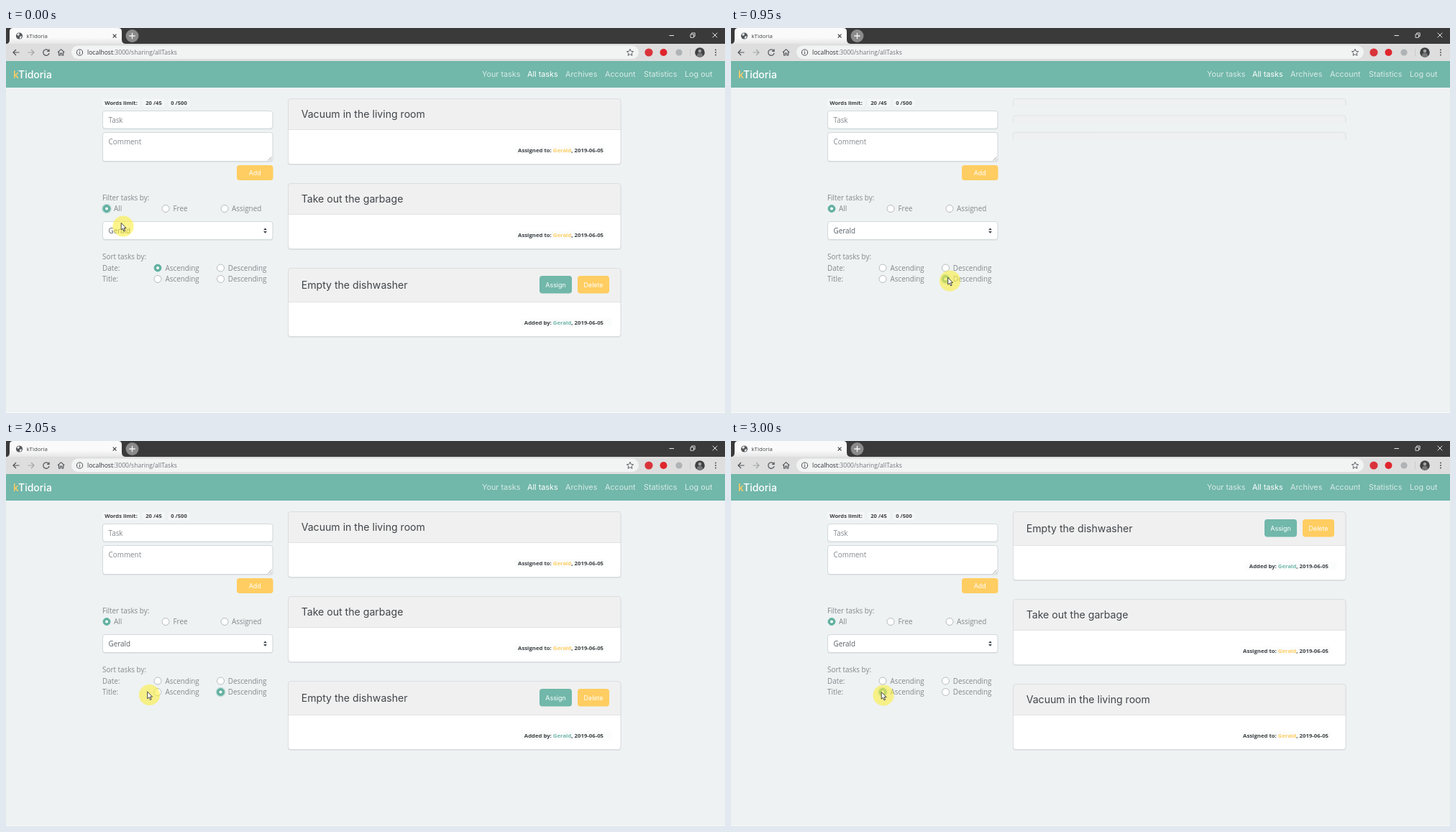
An HTML page that plays this animation: 1000 by 536 pixels, repeating every 3.45 s.

```html
<!DOCTYPE html>
<html lang="en">
<head>
<meta charset="utf-8">
<title>kTidoria</title>
<style>
  html, body { margin: 0; width: 100%; height: 100%; overflow: hidden; background: #eef2f3; }
  #stage { display: block; width: 100%; height: 100%; }
  text { font-family: "Open Sans", "Noto Sans", sans-serif; white-space: pre; }
  .wide { font-family: Inter, "Open Sans", sans-serif; }
</style>
</head>
<body>
<svg id="stage" viewBox="0 0 1000 536">
  <defs>
    <linearGradient id="tab" x2="0" y2="1">
      <stop offset=".6" stop-color="#fafafa"/>
      <stop offset="1" stop-color="#e6e6e6"/>
    </linearGradient>
  </defs>
</svg>
<script>
const LOOP = 3450, STEP = 50, GROW = 390;
const CLICKS = [910, 2610];
const TEAL = '#71b7aa', YELLOW = '#ffcd61', GREY = '#84898d', INK = '#414549';
const USER = 'Gerald', BRAND = 'kTidoria';
const stage = document.getElementById('stage');

function add(parent, tag, attrs, content) {
  const el = document.createElementNS('http://www.w3.org/2000/svg', tag);
  for (const k in attrs) el.setAttribute(k, attrs[k]);
  if (content) el.textContent = content;
  return parent.appendChild(el);
}
const rect = (p, x, y, width, height, fill, more) => add(p, 'rect', { x, y, width, height, fill, ...more });
const disc = (p, cx, cy, r, fill, more) => add(p, 'circle', { cx, cy, r, fill, ...more });
const line = (p, d, stroke, w = 1.1, more) =>
  add(p, 'path', { d, stroke, fill: 'none', 'stroke-width': w, ...more });
const label = (p, x, y, size, fill, str, more) =>
  add(p, 'text', { x, y, 'font-size': size, fill, ...more }, str);
const wide = (p, x, y, size, fill, str, more) =>
  label(p, x, y, size, fill, str, { class: 'wide', ...more });

function browser() {
  const dark = '#505357';
  rect(stage, 0, 0, 1000, 23, '#3a3a3a');
  add(stage, 'path', { d: 'M0 22Q5 22 5 16V5Q5 0 10 0H156Q161 0 161 5V16Q161 22 167 22Z', fill: 'url(#tab)' });
  rect(stage, 0, 22, 1000, 24, '#dedede');
  disc(stage, 18.5, 11, 4.6, '#55585b');
  add(stage, 'path', { d: 'M15 9l3-2 1 2-2 2zM19 12l3-1-1 3-2 1z', fill: '#fafafa' });
  label(stage, 28.5, 13.8, 7.8, '#404346', BRAND);
  line(stage, 'M148.7 8.7l4.8 4.8m0-4.8l-4.8 4.8', '#444');
  disc(stage, 175.5, 11, 9, '#8a8a8a');
  line(stage, 'M171.3 11h8.4M175.5 6.8v8.4', '#f4f4f4', 1.3);
  line(stage, 'M922.5 10.5h6.5M982.7 6.7l6.6 6.6m0-6.6l-6.6 6.6', '#e8e8e8', 1);
  line(stage, 'M952 8.8h4.5v4.5h-4.5zM953.7 8.5v-1.6h4.5v4.6h-1.5', '#e8e8e8', 0.9);

  line(stage, 'M18.5 34H10M14 30l-4 4 4 4', dark, 1.2);
  line(stage, 'M30.5 34H39M35 30l4 4-4 4', '#a2a5a7', 1.2);
  line(stage, 'M59.3 31.5a4.2 4.2 0 1 0 .8 3.4M60 29.6v2.8h-2.9', dark, 1.2);
  line(stage, 'M72 34l4.6-4.3 4.6 4.3M73.5 33.5v4.5h2v-3h2.2v3h2v-4.5', dark, 1.1);
  rect(stage, 91, 24.5, 789, 18.5, '#f2f4f4', { rx: 9.2 });
  disc(stage, 102.5, 34, 4.1, 'none', { stroke: dark });
  line(stage, 'M102.5 33.5v2.7M102.5 31.4v1.1', dark);
  const url = label(stage, 113, 37.1, 8.6, '#303336', 'localhost');
  add(url, 'tspan', { fill: '#73777b' }, ':3000/sharing/allTasks');
  line(stage, 'M868 29.3l1.4 3.1 3.3.3-2.5 2.3.7 3.3-2.9-1.7-2.9 1.7.7-3.3-2.5-2.3 3.3-.3z', dark, 0.9);
  disc(stage, 894, 34, 5.6, '#d9333a');
  disc(stage, 914.5, 34, 5, '#e0252d');
  disc(stage, 936, 34, 4.6, '#b0b3b5');
  rect(stage, 951, 29, 0.8, 10, '#c2c5c7');
  disc(stage, 965, 34, 6.8, '#3f4143');
  disc(stage, 965, 32, 2.3, '#a3a1a0');
  add(stage, 'path', { d: 'M960.8 38.8a4.2 4.2 0 0 1 8.4 0 6.8 6.8 0 0 1-8.4 0z', fill: '#777' });
  for (const y of [30.5, 34, 37.5]) disc(stage, 987, y, 1, dark);
}

function navbar() {
  rect(stage, 0, 46, 1000, 37, TEAL);
  const brand = wide(stage, 10, 69.8, 14, '#fff', '', { 'font-weight': 500 });
  add(brand, 'tspan', { fill: YELLOW }, BRAND[0]);
  add(brand, 'tspan', {}, BRAND.slice(1));
  const links = { 'Your tasks': 662, 'All tasks': 725, Archives: 778, Account: 833, Statistics: 887, 'Log out': 944 };
  for (const name in links) {
    wide(stage, links[name], 68.4, 10.8, name === 'All tasks' ? '#fff' : '#d8ebe7', name);
  }
}

function field(y, h) {
  rect(stage, 134, y + 1, 237.5, h, '#000', { rx: 4, opacity: 0.06 });
  rect(stage, 134.5, y + 0.5, 236.5, h - 1, '#fff', { rx: 3.5, stroke: '#d2d9dc' });
}

function radio(x, y) {
  const g = add(stage, 'g');
  const ring = disc(g, x, y, 6.8, TEAL, { opacity: 0.4 });
  const dot = disc(g, x, y, 5, '#fff');
  const hole = disc(g, x, y, 2, '#fff');
  return (state, focus) => {
    const on = state === 'on', down = state === 'down';
    ring.setAttribute('visibility', focus ? 'visible' : 'hidden');
    hole.setAttribute('visibility', on ? 'visible' : 'hidden');
    dot.setAttribute('fill', on ? '#62b0a1' : '#fff');
    dot.setAttribute('stroke', on ? '#62b0a1' : down ? '#a8672a' : '#adb3b7');
    dot.setAttribute('stroke-width', down ? 1.8 : 0.9);
  };
}

function button(p, x, y, w, h, fill, str) {
  rect(p, x, y, w, h, fill, { rx: 4 });
  wide(p, x + w / 2, y + h / 2 + 3.4, 8.9, '#fff', str, { 'text-anchor': 'middle' });
}

function sidebar() {
  for (const [x, w, str] of [[134, 52, 'Words limit:'], [190, 31, '20 /45'], [225.5, 30, '0 /500']]) {
    rect(stage, x, 98.5, w, 11.5, '#f4f6f7', { rx: 3 });
    label(stage, x + w / 2, 107.1, 7.6, '#3c4043', str, { 'font-weight': 700, 'text-anchor': 'middle' });
  }
  field(115, 25.5);
  field(145, 41);
  field(269, 26);
  line(stage, 'M364.5 184.5l5-5M367.5 184.5l2-2', '#888', 0.8);
  button(stage, 321, 191, 50.5, 21, YELLOW, 'Add');
  add(stage, 'path', { d: 'M358.1 281.2l2.4-2.8 2.4 2.8zM358.1 282.9l2.4 2.8 2.4-2.8z', fill: '#343a40' });
  const texts = [
    [142.5, 131.8, 'Task'], [142.5, 161.8, 'Comment'], [134, 240, 'Filter tasks by:'],
    [150, 255.4, 'All'], [232.5, 255.4, 'Free'], [314, 255.4, 'Assigned'],
    [134, 322, 'Sort tasks by:'], [134, 337.8, 'Date:'], [134, 353.4, 'Title:']
  ];
  for (const y of [337.8, 353.4]) texts.push([221.5, y, 'Ascending'], [308.7, y, 'Descending']);
  for (const [x, y, str] of texts) label(stage, x, y, 9.9, GREY, str);
  label(stage, 142.5, 286, 9.9, '#5c6166', USER);
}

function card(title, caption, color, own) {
  const head = own ? 47 : 43, H = head + 49;
  const box = add(stage, 'svg', { x: 388, width: 472, overflow: 'hidden' });
  const g = add(box, 'g', { transform: 'translate(4 2)' });
  rect(g, 0, 1, 463.5, H, '#000', { rx: 4, opacity: 0.07 });
  rect(g, 0.5, 0.5, 462.5, H - 1, '#fff', { rx: 3.5 });
  add(g, 'path', { d: `M.5 ${head}V4Q.5 .5 4 .5H459.5Q463 .5 463 4V${head}Z`, fill: '#f0f0f0' });
  rect(g, 0, head, 463.5, 0.9, '#dedfe0');
  rect(g, 0.5, 0.5, 462.5, H - 1, 'none', { rx: 3.5, stroke: '#dadddf' });
  wide(g, 18.7, head / 2 + 5.2, 14.1, INK, title);
  if (own) {
    button(g, 350, 11, 45, 24.5, TEAL, 'Assign');
    button(g, 403, 11, 44, 24.5, YELLOW, 'Delete');
  }
  const left = own ? 324 : 316;
  rect(g, left, head + 23.5, 127, 11.5, '#fbfcfc', { rx: 3 });
  const note = label(g, 439, head + 32.1, 7.75, '#3c4043', '', { 'font-weight': 700, 'text-anchor': 'end' });
  add(note, 'tspan', {}, caption + ': ');
  add(note, 'tspan', { fill: color }, USER);
  add(note, 'tspan', {}, ', 2019-06-05');
  return { box, g, H };
}

browser();
navbar();
sidebar();
rect(stage, 0, 535, 1000, 1, '#fbfcfc');

const radios = {
  all: radio(140, 251.5), free: radio(222, 251.5), assigned: radio(304, 251.5),
  dateAsc: radio(211, 334), dateDesc: radio(298.5, 334),
  titleAsc: radio(211, 349.5), titleDesc: radio(298.5, 349.5)
};
const cards = [
  card('Vacuum in the living room', 'Assigned to', YELLOW),
  card('Take out the garbage', 'Assigned to', YELLOW),
  card('Empty the dishwasher', 'Added by', TEAL, true)
];
const reversed = [...cards].reverse();
const halo = disc(stage, 0, 0, 14.6, '#fbef40', { opacity: 0.6 });
const arrow = add(stage, 'path', {
  d: 'M0 0V9.8L2.2 7.8 3.8 11.5 5.4 10.8 3.8 7.2H6.9Z', fill: '#fff', stroke: '#333', 'stroke-width': 0.9
});

// time, x, y of the pointer highlight
const PATH = [
  [0, 163, 276], [200, 190, 299], [400, 242, 327], [500, 290, 346], [550, 308, 351],
  [650, 306, 351], [850, 304.5, 352], [1750, 304.5, 352], [1900, 262, 352], [2000, 209, 353.5],
  [2050, 199.5, 353.5], [2200, 206, 354], [2300, 212, 354], [LOOP, 212, 354]
];

function pointer(t) {
  const i = PATH.findIndex(p => p[0] > t);
  const [a, b] = [PATH[i - 1], PATH[i]];
  const k = (t - a[0]) / (b[0] - a[0]);
  return [1, 2].map(n => a[n] + (b[n] - a[n]) * k);
}

// CSS "ease" curve
function ease(p) {
  if (p >= 1) return 1;
  let lo = 0, hi = 1, s;
  const curve = (a, b) => 3 * a * s * (1 - s) ** 2 + 3 * b * s * s * (1 - s) + s ** 3;
  for (let i = 0; i < 24; i++) {
    s = (lo + hi) / 2;
    if (curve(0.25, 0.25) < p) lo = s; else hi = s;
  }
  return curve(0.1, 1);
}

function draw(t) {
  const clicks = CLICKS.filter(c => t >= c).length;
  const e = clicks ? ease((t - CLICKS[clicks - 1]) / GROW) : 1;
  let y = 98;
  for (const c of clicks === 2 ? reversed : cards) {
    const h = e * (c.H + 13);
    c.box.setAttribute('y', y - 2);
    c.box.setAttribute('height', h + 2);
    c.g.setAttribute('opacity', 0.75 + 0.25 * e);
    y += h + 13;
  }

  const pressed = n => clicks === n && t >= CLICKS[n] - 60;
  radios.all('on', clicks === 0 && !pressed(0));
  radios.free();
  radios.assigned();
  radios.dateAsc(clicks ? '' : 'on');
  radios.dateDesc();
  radios.titleDesc(clicks === 1 ? 'on' : pressed(0) ? 'down' : '', clicks === 1);
  radios.titleAsc(clicks === 2 ? 'on' : pressed(1) ? 'down' : '', clicks === 2);

  const [x, py] = pointer(t);
  halo.setAttribute('cx', x);
  halo.setAttribute('cy', py);
  arrow.setAttribute('transform', `translate(${x - 2.8} ${py - 4.6})`);
}

const start = performance.now();
function tick() {
  const t = (performance.now() - start) % LOOP;
  draw(Math.floor(t / STEP) * STEP);
  requestAnimationFrame(tick);
}
tick();
</script>
</body>
</html>
```
